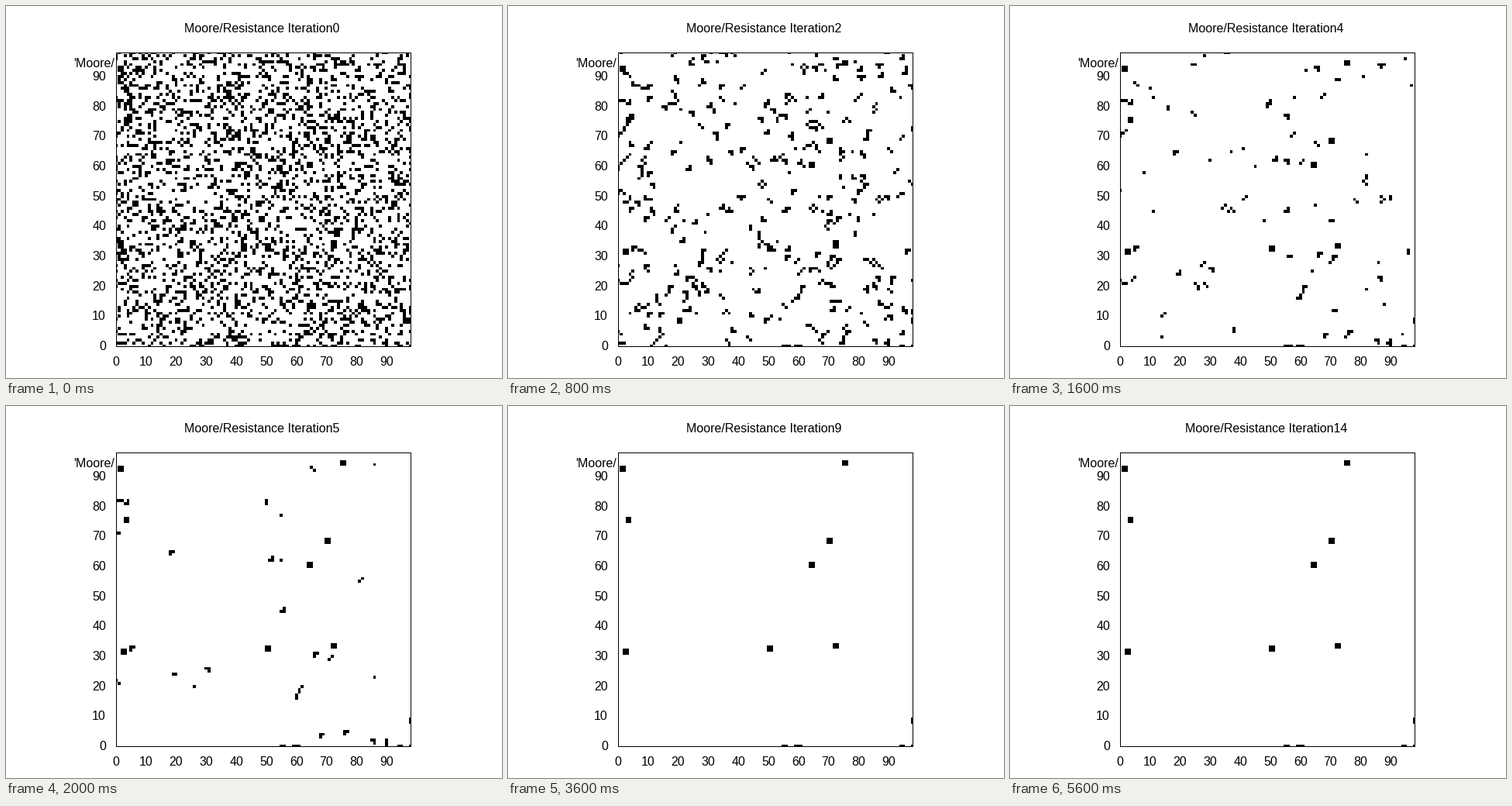
These frames come from a looping animation (640 px wide and 480 px high, 6 s). A matplotlib script:

```python
import numpy as np
import matplotlib.pyplot as plt
from matplotlib.animation import FuncAnimation

WIDTH, HEIGHT, DPI = 640, 480, 100
LEFT, RIGHT, TOP, BOTTOM = 142, 522, 60, 439
SIZE, VIEW = 100, 98
STEPS, STEP_MS = 15, 400
DENSITY, RESISTANCE = 0.26, 0.72
SOUP_STEPS = 6

plt.rcParams["font.family"] = "Liberation Sans"
plt.rcParams["font.size"] = 16 * 72 / DPI

# Lower left corners of the stable 2x2 blocks; the grid wraps round.
BLOCKS = [(1, 92), (3, 75), (2, 31), (50, 32), (72, 33), (64, 60), (70, 68),
          (75, 94), (98, 8), (55, 99), (59, 99), (60, 99), (94, 99), (98, 99)]

# The longest-lived chain, eaten from both ends.
CHAIN = [(0, 82), (1, 82), (2, 82), (3, 81), (4, 81), (4, 82)]


def grid_of(cells):
    grid = np.zeros((SIZE, SIZE), bool)
    for x, y in cells:
        grid[y % SIZE, x % SIZE] = True
    return grid


def survivors(grid):
    """Keep live cells with two or three live Moore neighbours."""
    around = sum(np.roll(grid.astype(int), (dy, dx), (0, 1))
                 for dy in (-1, 0, 1) for dx in (-1, 0, 1) if dx or dy)
    return grid & ((around == 2) | (around == 3))


def build_states():
    rng = np.random.default_rng(14)
    blocks = grid_of((x + i, y + j) for x, y in BLOCKS
                     for i in (0, 1) for j in (0, 1))
    soup = rng.random((SIZE, SIZE)) < DENSITY
    states = []
    for step in range(STEPS):
        eaten = max(0, step - SOUP_STEPS + 1)
        chain = grid_of(CHAIN[eaten:max(eaten, len(CHAIN) - eaten)])
        states.append(blocks | chain | soup)
        soup = survivors(soup)
        if step >= 2:
            soup &= rng.random((SIZE, SIZE)) < RESISTANCE
        if step + 1 >= SOUP_STEPS:
            soup[:] = False
    return states


def label(x, baseline, text, align):
    return fig.text(x / WIDTH, 1 - baseline / HEIGHT, text,
                    ha=align, va="baseline")


states = build_states()
fig = plt.figure(figsize=(WIDTH / DPI, HEIGHT / DPI), dpi=DPI,
                 facecolor="white")
ax = fig.add_axes([LEFT / WIDTH, 1 - BOTTOM / HEIGHT,
                   (RIGHT - LEFT) / WIDTH, (BOTTOM - TOP) / HEIGHT])
image = ax.imshow(states[0], cmap="gray_r", vmin=0, vmax=1, origin="lower",
                  interpolation="nearest", aspect="auto",
                  extent=(-0.5, SIZE - 0.5, -0.5, SIZE - 0.5))
ax.set(xlim=(0, VIEW), ylim=(0, VIEW), xticks=[], yticks=[])
for spine in ax.spines.values():
    spine.set_linewidth(72 / DPI)

for value in range(0, VIEW, 10):
    part = value / VIEW
    label(LEFT + part * (RIGHT - LEFT), 464, str(value), "center")
    label(129, BOTTOM - part * (BOTTOM - TOP) + 5, str(value), "right")
label(140.5, 79, "'Moore/", "right")
title = label(330.5, 34, "", "center")


def draw(step):
    image.set_data(states[step])
    title.set_text(f"Moore/Resistance Iteration{step}")
    return image, title


animation = FuncAnimation(fig, draw, frames=STEPS, interval=STEP_MS,
                          repeat=True, repeat_delay=0)
plt.show()
```
